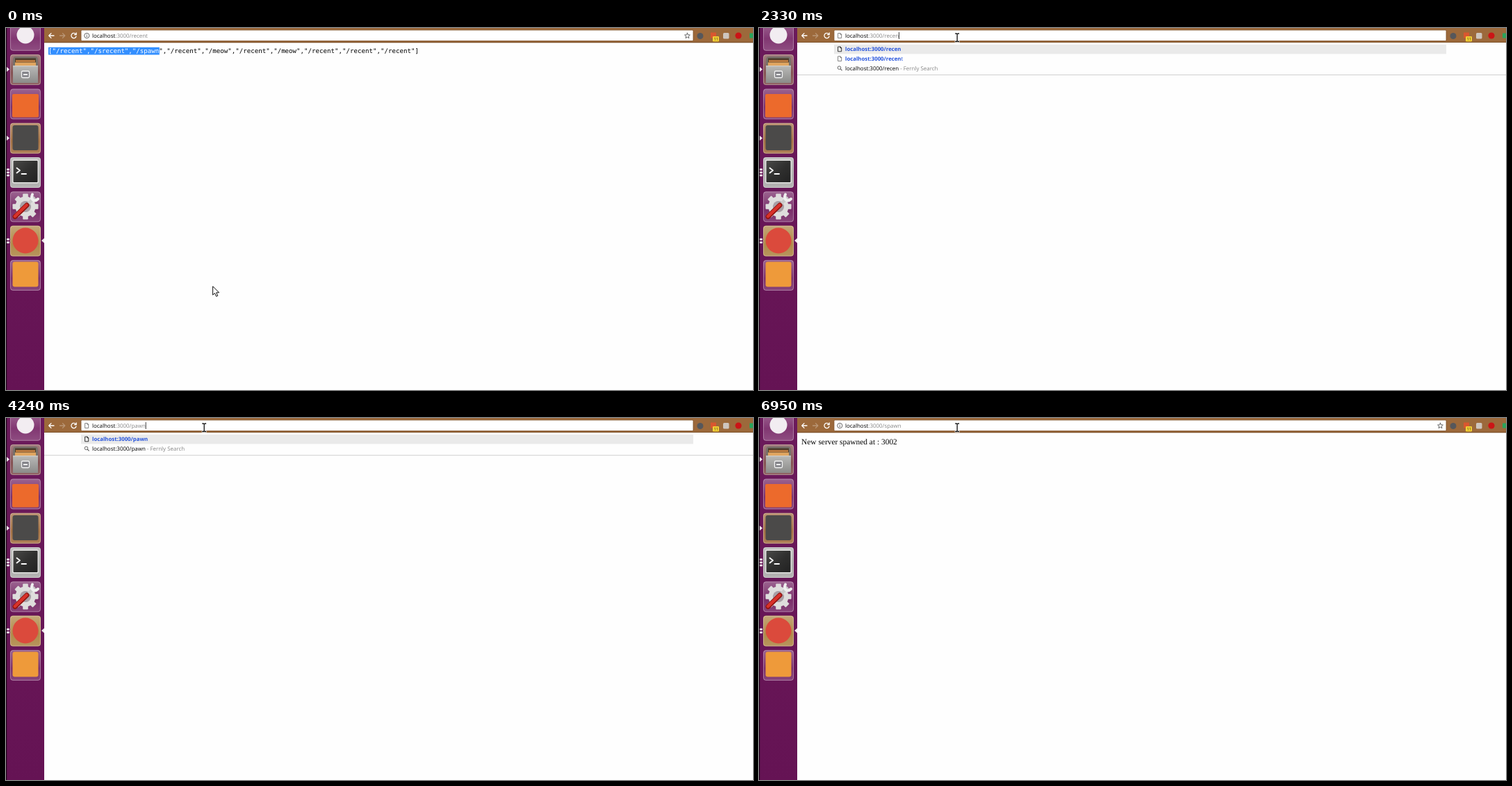
An HTML page that plays this animation: 1075x521 px, repeating every 8000 ms.

```html
<!DOCTYPE html>
<html lang="en">
<head>
<meta charset="utf-8">
<title>Spawning a server</title>
<style>
  html, body { margin: 0; width: 100%; height: 100%; overflow: hidden; background: #fefefe; }
  svg { display: block; width: 1075px; height: 521px; }
  text { white-space: pre; text-rendering: geometricPrecision; font: 7.94px "Open Sans", sans-serif; }
  .bold { font-weight: 700; font-size: 7.8px; }
  .mono { font: 9.15px "DejaVu Sans Mono", monospace; }
  .serif { font: 11.42px "Liberation Serif", serif; }
  .link { fill: #2553dc; }
  .dim { fill: #858585; }
  .line { fill: none; stroke-linecap: round; stroke-linejoin: round; }
</style>
</head>
<body>
<svg viewBox="0 0 1075 521">
  <defs>
    <linearGradient id="bar" x2="0" y2="1">
      <stop stop-color="#6b1a5b"/><stop offset="1" stop-color="#651354"/>
    </linearGradient>
    <linearGradient id="shine" x2="0" y2="1">
      <stop stop-color="#fff" stop-opacity=".28"/><stop offset=".6" stop-color="#fff" stop-opacity=".04"/>
      <stop offset="1" stop-color="#fff" stop-opacity=".14"/>
    </linearGradient>
    <linearGradient id="steel" x2="0" y2="1">
      <stop stop-color="#b9b9b7"/><stop offset="1" stop-color="#8b8b89"/>
    </linearGradient>
    <linearGradient id="screen" x2="1" y2="1">
      <stop stop-color="#4a4a48"/><stop offset=".5" stop-color="#30302f"/><stop offset="1" stop-color="#222"/>
    </linearGradient>
    <g id="arrow">
      <path d="M.6 .8V13.2L3.5 10.6L5.6 15.3L7.7 14.4L5.7 9.8H9.6Z" fill="#fff" stroke="#111"/>
    </g>
    <g id="beam" class="line">
      <path d="M.8 1H2.2L3.2 1.8L4.2 1H5.6M3.2 1.8V11.6M.8 12.5H2.2L3.2 11.6L4.2 12.5H5.6" stroke="#fff" stroke-width="2.6"/>
      <path d="M.8 1H2.2L3.2 1.8L4.2 1H5.6M3.2 1.8V11.6M.8 12.5H2.2L3.2 11.6L4.2 12.5H5.6" stroke="#111" stroke-width="1.3"/>
    </g>
  </defs>

  <rect width="1075" height="521" fill="#fefefe"/>
  <g id="page"></g>

  <!-- browser toolbar -->
  <rect x="55" width="1020" height="21" fill="#9c693b"/>
  <rect x="55" y="20" width="1020" height="1.3" fill="#7d5129"/>
  <rect x="108" y="3" width="881" height="15.6" rx="1.5" fill="#fff" stroke="#80542c" stroke-width=".8"/>
  <g class="line" stroke="#fff" stroke-width="1.3">
    <path d="M69 11H62M65 7.6L61.7 11L65 14.4"/>
    <path d="M77.5 11H84.5M81.5 7.6L84.8 11L81.5 14.4" opacity=".3"/>
    <path d="M100.4 8.8A3.6 3.6 0 1 0 101 12M101.2 7V9.6H98.5"/>
  </g>
  <circle cx="999" cy="11.5" r="4.5" fill="#55575b"/>
  <rect x="1014" y="6.5" width="8" height="8" fill="#d9572f"/>
  <rect x="1017" y="12" width="9" height="7.4" rx="1" fill="#f3cf35"/>
  <text x="1018.4" y="18.2" style="font-size:6px" fill="#443a10">11</text>
  <rect x="1032" y="7" width="8.5" height="8.5" rx="1.5" fill="#cdc5be"/>
  <circle cx="1054" cy="11" r="4.6" fill="#cb1416"/>
  <rect x="1070" y="7.5" width="6" height="7" fill="#2ba35b"/>

  <g id="menu"></g>
  <g id="omnibox"></g>

  <!-- launcher -->
  <rect width="55" height="521" fill="url(#bar)"/>
  <rect width="1.2" height="521" fill="#1c0518"/>
  <g id="tiles"></g>
  <circle cx="28" cy="10" r="12.5" fill="#f2edf1"/>

  <path d="M10 79V46Q10 41 14 41H42Q46 41 46 46V79Z" fill="#77706a"/>
  <rect x="13" y="43.5" width="30" height="12" fill="#4b3a2a"/>
  <path d="M14 46H42V49H14Z" fill="#b9793e"/>
  <path d="M13 49.5H43V55H13Z" fill="#e1a661"/>
  <path d="M10 54.5H46V79H10Z" fill="url(#steel)"/>
  <path d="M10 54.8H46" stroke="#d4d4d2"/>
  <rect x="22.5" y="62" width="11" height="9.5" rx="1.5" fill="#85858a" stroke="#f2f2f2" stroke-width="1.3"/>
  <path d="M25 67H31" stroke="#f2f2f2" stroke-width="2"/>

  <rect x="9" y="95" width="38" height="33.5" rx="2" fill="#ec6a2c"/>
  <rect x="9.5" y="140" width="37" height="36" rx="3" fill="#4b4a49"/>

  <rect x="9" y="189.5" width="38" height="34" rx="2" fill="#e6e6e4"/>
  <rect x="10.5" y="191" width="35" height="31" rx="1" fill="url(#screen)"/>
  <path class="line" d="M15.5 201.5L20 205L15.5 208.5M22.5 210H29" stroke="#fff" stroke-width="1.8"/>

  <g id="gear"></g>
  <circle cx="28" cy="257" r="11" fill="none" stroke="#dedddc" stroke-width="7"/>
  <circle cx="28" cy="257" r="8" fill="#a9a0a6"/>
  <g class="line">
    <path d="M30 255L40 245" stroke="#c9c9c9" stroke-width="4.5"/>
    <path d="M38 239.5Q35.5 245 39 247.5Q42 250 46 246" stroke="#efefef" stroke-width="4"/>
    <path d="M13 271.5L30 255" stroke="#8f1512" stroke-width="7"/>
    <path d="M13 271L29.5 255" stroke="#d9322a" stroke-width="4.5"/>
  </g>

  <circle cx="28" cy="306" r="18.5" fill="#db4a3c"/>
  <rect x="9.5" y="336.5" width="37" height="36" rx="3" fill="#ee9a3a"/>

  <path d="M1 56V63L5 59.5ZM1 155V162L5 158.5ZM55 302.5V309.5L51 306Z" fill="#eee9ed"/>
  <g id="pips"></g>

  <use id="pointer"/>
</svg>
<script>
const LOOP = 8000, HOST = 'localhost', PORT = ':3000/', SITE = HOST + PORT;
const URL_X = 124, ROW = 13.8;
const $ = id => document.getElementById(id);
const rect = (x, y, w, h, fill, more = '') =>
  `<rect x="${x}" y="${y}" width="${w}" height="${h}" fill="${fill}" ${more}/>`;
const label = (x, y, body, cls = '') => `<text x="${x}" y="${y}" class="${cls}">${body}</text>`;
const span = (cls, body) => `<tspan class="${cls}">${body}</tspan>`;

// Launcher tiles, top to bottom
$('tiles').innerHTML = ['#7c2f6c', '#7f4a4c', '#742664', '#a06a3c', '#a9a8a7', '#742664', '#ad8442', '#742664']
  .map((fill, i) => {
    const y = -11.2 + i * 49.3;
    return rect(6, y, 44, 44, fill, 'rx="4"') +
      rect(6.5, y + .5, 43, 43, 'url(#shine)', 'rx="3.5" stroke="#fff" stroke-opacity=".35"');
  }).join('');
$('gear').innerHTML = [...Array(8).keys()].map(i =>
  rect(24.2, 238.5, 7.6, 8, '#dedddc', `rx="1" transform="rotate(${i * 45} 28 257)"`)).join('');
$('pips').innerHTML = [203.5, 207.8, 212, 304, 308.5].map(y => rect(1, y - 1.2, 4, 2.6, '#eee9ed', 'rx="1"')).join('');

const stop = (at, x, y, shape = 'arrow') => ({ at, x, y, shape });
const stops = [
  stop(0, 297, 371), stop(120, 362, 392), stop(270, 310, 230), stop(400, 262, 71),
  stop(550, 264, 43), stop(700, 274, 24, 'beam'), stop(850, 282, 7, 'beam')
];

// Browser states; "more" lists the suggested paths and "foot" is the bottom of the menu
const BLUE = '#338fff', GRAY = '#c8c8c8';
const typing = (at, path, more = [], caret = path.length, foot = 53.2 + more.length * ROW) =>
  ({ at, path, more, caret, foot, mark: GRAY });
const states = [
  { at: 0, path: 'recent', mark: BLUE },
  { at: 1160, path: 'recent', mark: GRAY, selected: true },
  { at: 2030, path: 'recent', mark: GRAY, caret: 6 },
  typing(2330, 'recen', ['recent']),
  typing(2610, 'rece', ['recent']),
  typing(2760, 'rec', ['recent']),
  typing(2910, 're', ['recent']),
  typing(3040, 'r', ['recent']),
  typing(3510, '', ['recent', 'spawn', 'meow']),
  typing(3810, 'p', [], 1, 60),
  typing(3960, 'pa'),
  typing(4090, 'paw'),
  typing(4240, 'pawn'),
  typing(4670, 'pawn', [], null),
  typing(5220, 'pawn'),
  typing(5660, 'pawn', [], 3),
  typing(5810, 'pawn', [], 2),
  typing(5960, 'pawn', [], 1),
  typing(6090, 'pawn', [], 0),
  typing(6390, 'spawn', ['spawn/'], 1),
  { at: 6820, path: 'spawn', mark: BLUE },
  { at: 6950, path: 'spawn', done: true }
];

const paths = ['recent', 'srecent', 'spawn', 'recent', 'meow', 'recent', 'meow', 'recent', 'recent', 'recent'];
const log = '[' + paths.map(p => `"/${p}"`).join(',') + ']';
const MARKED = 29;

function drawPage({ done, mark }) {
  if (done) return label(61, 38, 'New server spawned at : 3002', 'serif');
  const head = `<tspan fill="${mark === BLUE ? '#fff' : '#222'}">${log.slice(0, MARKED)}</tspan>`;
  return rect(61, 27.7, 159.8, 10.8, mark) + label(61, 36, head + log.slice(MARKED), 'mono');
}

const sheet = (y, color) =>
  `<path class="line" d="M114 ${y - 3.4}H117L118.7 ${y - 1.7}V${y + 3.4}H114ZM117 ${y - 3.4}V${y - 1.7}H118.7" stroke="${color}" stroke-width=".9"/>`;
const lens = y =>
  `<path class="line" d="M117.3 ${y + .9}L119.2 ${y + 2.8}" stroke="#666" stroke-width="1.2"/>` +
  `<circle cx="115.5" cy="${y - .8}" r="2.3" fill="none" stroke="#666"/>`;

function drawMenu({ foot, path, more }) {
  if (!foot) return '';
  const rows = ['', ...more].map((p, i) => {
    const rest = i ? p.slice(path.length) : '';
    return sheet(30.4 + i * ROW, i ? '#777' : '#222') +
      label(URL_X, 33.2 + i * ROW, span('bold', SITE + path) + rest, 'link');
  });
  const y = 30.4 + rows.length * ROW;
  return rect(55, 21, 1020, foot - 21, '#fefefe') + rect(55, foot, 1020, 1, '#cfcfcf') +
    rect(108, 24, 881, 13.4, '#eaeaea') + rows.join('') + lens(y) +
    label(URL_X, y + 2.8, SITE + path + span('dim', ' - Fernly Search'));
}

function drawOmnibox({ path, foot, selected }) {
  const icon = foot ? sheet(11, '#777') :
    '<circle cx="116.3" cy="11" r="3.6" fill="none" stroke="#555" stroke-width=".9"/>' +
    '<path d="M116.3 10.5V13M116.3 8.7V9.6" stroke="#555"/>' +
    '<path class="line" d="M980.5 7.2L981.6 9.8L984.4 10L982.3 11.9L982.9 14.6L980.5 13.1L978.1 14.6L978.7 11.9L976.6 10L979.4 9.8Z" stroke="#555" stroke-width=".9"/>';
  const tail = PORT + path;
  return icon + (selected ? rect(URL_X, 6, 80.5, 10, '#acd0f7') : '') +
    `<text id="url" x="${URL_X}" y="13.7">${HOST}${selected ? tail : span('dim', tail)}</text>`;
}

function drawCaret({ caret }) {
  if (caret == null) return;
  const width = $('url').getSubStringLength(0, SITE.length + caret);
  $('omnibox').innerHTML += rect(URL_X + width, 6, .8, 10, '#111');
}

const latest = (list, time) => list.filter(item => item.at <= time).pop();
const start = performance.now();
let shown;

function frame(now) {
  const time = Math.max(0, now - start) % LOOP;
  const { x, y, shape } = latest(stops, time);
  $('pointer').setAttribute('href', '#' + shape);
  $('pointer').setAttribute('transform', `translate(${x} ${y})`);

  const state = latest(states, time);
  if (state !== shown) {
    shown = state;
    $('page').innerHTML = drawPage(state);
    $('menu').innerHTML = drawMenu(state);
    $('omnibox').innerHTML = drawOmnibox(state);
    drawCaret(state);
  }
  requestAnimationFrame(frame);
}
frame(start);
</script>
</body>
</html>
```
